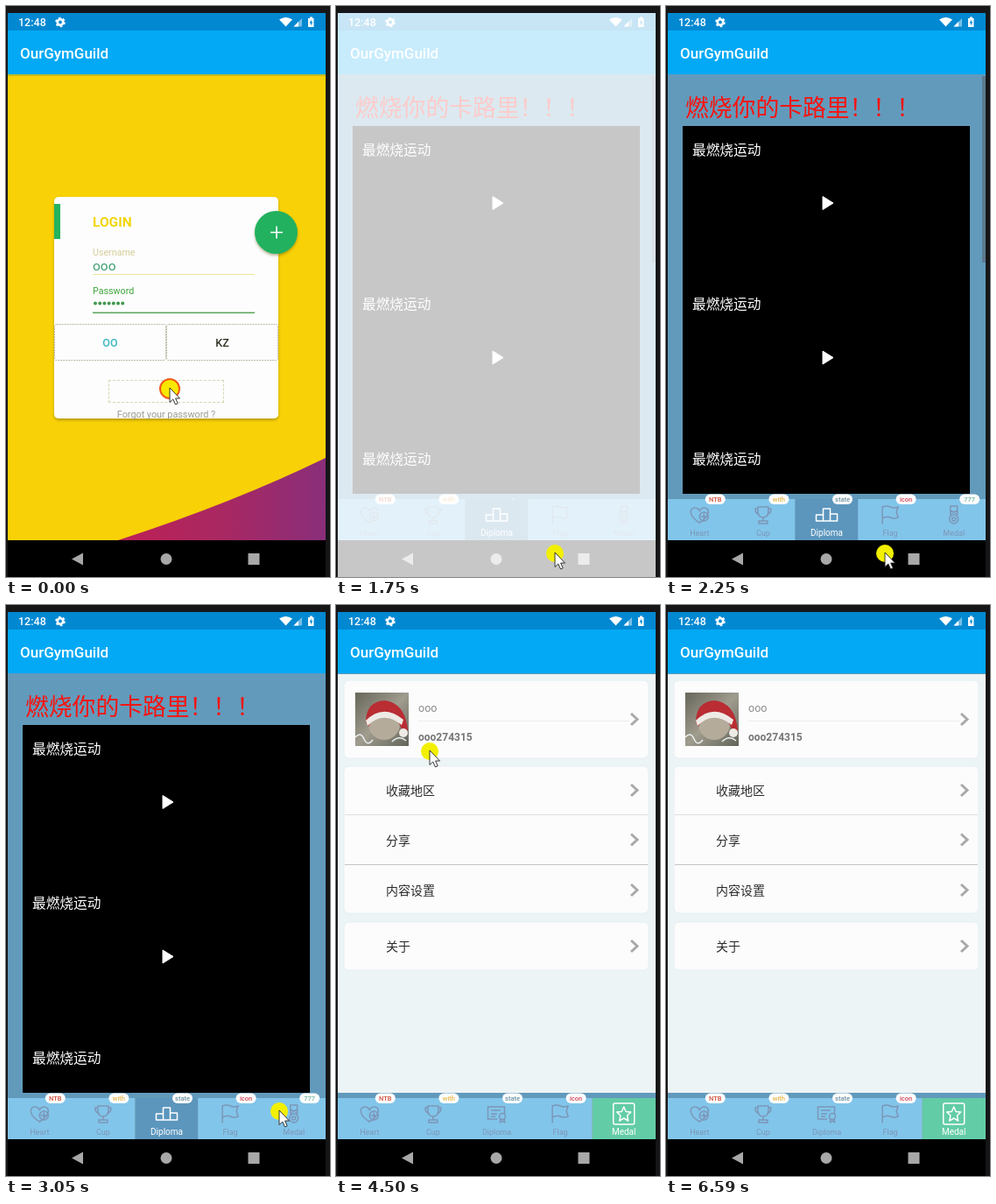
Write an HTML page that moves like this. It is 370 by 652 pixels and loops after 6.63 s.

```html
<!DOCTYPE html>
<html lang="en">
<head>
<meta charset="utf-8">
<title>Sport app walkthrough</title>
<style>
  html, body { margin: 0; width: 100%; height: 100%; overflow: hidden; background: #161618; }
  #stage { position: relative; width: 370px; height: 652px; overflow: hidden; }
  #stage > *, #login > svg, #right, #left { position: absolute; left: 0; top: 0; width: 370px; height: 652px; }
  svg { display: block; font-family: Roboto, "Noto Sans CJK SC", sans-serif; }
  .mid { text-anchor: middle; }
  .cjk { font-family: "Noto Sans CJK SC", "Noto Sans CJK", sans-serif; }
  .icon { fill: none; stroke: currentColor; stroke-width: 1.5; stroke-linejoin: round; stroke-linecap: round; }

  #pager, #scroll, #right, #left, #login, #flip, #veil, #cursor, #ring, #offDiploma, .badge {
    animation: 6630ms linear infinite;
  }

  #pager { animation-name: pager; }
  @keyframes pager {
    0%, 49.08% { transform: translateX(0); animation-timing-function: cubic-bezier(.22, 1, .36, 1); }
    58.7%, 100% { transform: translateX(-726px); }
  }
  #scroll { animation-name: scroll; }
  @keyframes scroll { 0%, 36.5% { opacity: 1; } 42%, 100% { opacity: 0; } }

  /* the tab pointer: its right edge leads, its left edge trails */
  #right { animation-name: right; }
  @keyframes right {
    0%, 49.83% { clip-path: inset(0 150.8px 0 0); animation-timing-function: cubic-bezier(.333, .667, .667, 1); }
    54.36%, 100% { clip-path: inset(0 5px 0 0); }
  }
  #left { animation-name: left; }
  @keyframes left {
    0%, 49.83% { clip-path: inset(0 0 0 147.2px); animation-timing-function: cubic-bezier(.333, 0, .667, .333); }
    54.36%, 100% { clip-path: inset(0 0 0 292.4px); }
  }
  #offDiploma { animation-name: unselect; }
  @keyframes unselect { 0%, 53% { opacity: 0; } 56%, 100% { opacity: 1; } }

  .badge { transform-box: fill-box; transform-origin: center; }
  #badge0, #badge1 { animation: none; }
  #badge2 { animation-name: pop2; }
  #badge3 { animation-name: pop3; }
  #badge4 { animation-name: pop4; }
  @keyframes pop2 { 0%, 26.1% { transform: scale(0); } 29%, 100% { transform: scale(1); } }
  @keyframes pop3 { 0%, 28.4% { transform: scale(0); } 31.4%, 100% { transform: scale(1); } }
  @keyframes pop4 {
    0%, 30.6% { transform: scale(0); }
    33.6%, 57.3% { transform: scale(1); }
    61.7%, 100% { transform: scale(0); }
  }

  #login { animation-name: login; }
  @keyframes login { 0%, 25.94% { visibility: visible; } 25.95%, 100% { visibility: hidden; } }
  #flip {
    position: absolute; left: 117px; top: 427px; width: 132px; height: 26px; box-sizing: border-box;
    border: 1px dashed #d6d6b4; background: #fdfdfd; color: #d8d8d0;
    font: 500 11px/24px Roboto, sans-serif; text-align: center;
    animation-name: flip;
  }
  @keyframes flip {
    0%, 18.85% { transform: perspective(230px) rotateX(0); }
    23.9%, 100% { transform: perspective(230px) rotateX(-180deg); }
  }

  #stage > #veil {
    left: 2px; top: 8px; width: 363px; height: 644px; background: #fff;
    animation-name: veil;
  }
  @keyframes veil {
    0%, 24.1% { opacity: 0; }
    25.94% { opacity: .9; }
    28.36% { opacity: .28; }
    32.4%, 100% { opacity: 0; }
  }

  #cursor { animation-name: cursor; }
  @keyframes cursor {
    0%, 15.84% { transform: translate(187px, 437px); visibility: visible; animation-timing-function: ease-in-out; }
    20.21%, 33.9% { transform: translate(250px, 625px); animation-timing-function: ease-in-out; }
    41.5%, 64.1% { transform: translate(312px, 578px); animation-timing-function: ease-in-out; }
    67.6%, 84.31% { transform: translate(107px, 167px); }
    86.12%, 89.29% { transform: translate(116px, 180px); }
    91.86%, 99.38% { transform: translate(120px, 240px); visibility: visible; }
    99.39%, 100% { transform: translate(120px, 240px); visibility: hidden; }
  }
  #ring { animation-name: ring; }
  @keyframes ring {
    0%, 1.35% { opacity: 1; }
    1.36%, 47.2% { opacity: 0; }
    47.21%, 49.6% { opacity: 1; }
    49.61%, 100% { opacity: 0; }
  }
</style>
</head>
<body>
<div id="stage">
  <svg viewBox="0 0 370 652">
    <rect x="2" y="8" width="363" height="20" fill="#0288d1"/>
    <rect x="2" y="28" width="363" height="51" fill="#03a9f4"/>
    <g fill="#fff">
      <text x="14" y="23" font-size="12.5" font-weight="500">12:48</text>
      <circle cx="62" cy="18.5" r="3.2" fill="none" stroke="#fff" stroke-width="2.6"/>
      <circle cx="62" cy="18.5" r="5" fill="none" stroke="#fff" stroke-width="1.6" stroke-dasharray="2.6 2.63"/>
      <path d="M312 15.5Q319.5 10.5 327 15.5L319.5 23.5Z"/>
      <path d="M328.5 23.5L338 14V23.5Z" opacity=".45"/><path d="M328.5 23.5L334 18V23.5Z"/>
      <path d="M345 14H347V12.5H350V14H351.5V24H345Z"/>
      <path d="M348.8 15.5L346.5 19.5H348V22.5L350.3 18.3H348.8Z" fill="#0288d1"/>
      <text x="16" y="60" font-size="17" font-weight="500">OurGymGuild</text>
    </g>
    <rect x="2" y="78" width="363" height="485" fill="#629abc"/>

    <svg x="2" y="79" width="363" height="478" viewBox="2 79 363 478">
      <g id="pager">
        <g id="videos">
          <text class="cjk" x="22" y="126" font-size="26.8" fill="#f8140f">燃烧你的卡路里！！！</text>
          <rect x="19" y="137" width="328" height="420"/>
          <g id="clips" class="cjk" font-size="15.7" fill="#fff"></g>
          <rect id="scroll" x="361" y="80" width="4" height="213" fill="#5c7a90" opacity=".6"/>
        </g>
        <g transform="translate(363)">
          <rect x="2" y="79" width="363" height="175" fill="url(#gym)"/>
          <path d="M2 150H365V166H2ZM60 79H72V230H60ZM190 79H200V230H190ZM325 85H365V130H325Z" fill="#a4bac4" opacity=".6"/>
          <path d="M2 215H365V254H2Z" fill="#191a1c"/>
          <g id="cards"></g>
        </g>
        <g transform="translate(726)">
          <rect x="2" y="79" width="363" height="478" fill="#edf4f5"/>
          <g fill="#fcfcfd" stroke="#e6f0f1">
            <rect x="9" y="86" width="348" height="89" rx="6"/>
            <rect x="9" y="184" width="348" height="168" rx="6"/>
            <rect x="9" y="362" width="348" height="55" rx="6"/>
          </g>
          <svg x="22" y="100" width="61" height="61" viewBox="0 0 61 61">
            <rect width="61" height="61" fill="url(#photo)"/>
            <circle cx="33" cy="36" r="18" fill="#b5ab9b"/>
            <path d="M12 34Q12 10 34 9Q57 12 60 43L54 46Q50 27 34 25Q22 25 15 39Z" fill="#b92d33"/>
            <path d="M12 32Q32 12 55 31L53 37Q32 20 14 38Z" fill="#eeeae6"/>
            <circle cx="55" cy="46" r="5" fill="#eeeae6"/>
            <path d="M0 51Q6 44 10 53T20 54M42 56Q50 48 58 55" fill="none" stroke="#e8efec" stroke-width="1.5"/>
          </svg>
          <text x="94" y="122" font-size="12.5" fill="#8a8a8a">ooo</text>
          <path d="M94 132.5H335" stroke="#e8eeea"/>
          <text x="94" y="155" font-size="12" font-weight="700" fill="#757575">ooo274315</text>
          <path d="M10 239.5H356" stroke="#dedfe0"/>
          <path d="M10 296.5H356" stroke="#c4c5c6"/>
          <g id="menu" class="cjk" font-size="14" fill="#2b2b2b"></g>
        </g>
      </g>
    </svg>
    <g id="tabs"><rect x="2" y="563" width="363" height="47" fill="#82c5ea"/></g>
    <rect x="2" y="610" width="363" height="42"/>
    <g fill="#a8a8a8">
      <path d="M75 631.5L88 624.5V638.5Z"/><circle cx="183" cy="631.5" r="6.5"/><rect x="276.5" y="625" width="13" height="13"/>
    </g>
    <defs>
      <linearGradient id="gym" x2="0" y2="1"><stop stop-color="#59656b"/><stop offset=".5" stop-color="#262f36"/><stop offset="1" stop-color="#413f3c"/></linearGradient>
      <linearGradient id="photo" x2="1" y2="1"><stop stop-color="#66665a"/><stop offset=".5" stop-color="#a09c8e"/><stop offset="1" stop-color="#62645a"/></linearGradient>
    </defs>
  </svg>

  <div id="right"><div id="left"><svg viewBox="0 0 370 652"><g id="active"></g></svg></div></div>
  <svg id="badges" viewBox="0 0 370 652"></svg>

  <div id="login">
    <svg viewBox="0 0 370 652">
      <defs>
        <linearGradient id="hill"><stop stop-color="#bd2054"/><stop offset=".5" stop-color="#a92862"/><stop offset="1" stop-color="#892e7a"/></linearGradient>
        <filter id="shade" x="-20%" y="-20%" width="140%" height="150%"><feDropShadow dx="0" dy="2" stdDeviation="1.8" flood-color="#5a4a00" flood-opacity=".4"/></filter>
      </defs>
      <rect x="2" y="78" width="363" height="532" fill="#f8d106"/>
      <rect x="2" y="78" width="363" height="2" fill="#9fae34" opacity=".6"/>
      <path d="M128 610Q258 568 365 516V610Z" fill="url(#hill)"/>
      <rect x="55" y="218" width="256" height="253" rx="5" fill="#fdfdfd" filter="url(#shade)"/>
      <rect x="55" y="226" width="7" height="40" fill="#24b35f"/>
      <circle cx="308.5" cy="258.5" r="24.5" fill="#24b15f" filter="url(#shade)"/>
      <path d="M302 258.5H316M309 251.5V265.5" stroke="#fff" stroke-width="1.7"/>
      <text x="99" y="252" font-size="15.5" font-weight="700" fill="#f2d508">LOGIN</text>
      <text x="99" y="285" font-size="10.7" fill="#d3cf9a">Username</text>
      <text x="99" y="302" font-size="15.5" fill="#3d9f70">ooo</text>
      <path d="M99 306.5H284" stroke="#ebe4a0"/>
      <text x="99" y="329" font-size="10.7" fill="#3fa53c">Password</text>
      <path d="M102 339.5H134" stroke="#449750" stroke-width="4" stroke-linecap="round" stroke-dasharray="0 5.2"/>
      <path d="M99 350.3H284" stroke="#5ba55a" stroke-width="1.4"/>
      <g fill="none" stroke="#b8b8a0" stroke-dasharray="2 1">
        <rect x="55.5" y="363.5" width="127" height="41" rx="2"/><rect x="183.5" y="363.5" width="127" height="41" rx="2"/>
      </g>
      <g class="mid" font-size="12.5" font-weight="500">
        <text x="119" y="389" fill="#3db8c4">OO</text><text x="247" y="389" fill="#333326">KZ</text>
      </g>
      <text class="mid" x="183" y="470" font-size="10.8" fill="#9a9a94">Forgot your password ?</text>
    </svg>
    <div id="flip">GO</div>
  </div>

  <div id="veil"></div>
  <svg viewBox="0 0 370 652">
    <g id="cursor">
      <circle r="10" fill="#f2f000"/>
      <circle id="ring" r="11" fill="#f8e800" stroke="#f25a1c" stroke-width="2"/>
      <path d="M0 -1V15.5L3.8 12L6.5 18L9.2 16.8L6.6 11H11.5Z" fill="#fff" stroke="#222" stroke-width=".9"/>
    </g>
  </svg>
</div>

<script>
  const put = (id, markup) => document.getElementById(id).insertAdjacentHTML("beforeend", markup);

  const icons = {
    heart: "M0 9C-13 1-12-8-5-8C-2-8 0-5 0-4C0-5 2-8 5-8C12-8 13 1 0 9M0 2a5 5 0 1 0 10 0a5 5 0 1 0-10 0M5-1V5M2 2H8",
    cup: "M-6-9H6V-3A6 6 0 0 1-6-3ZM-6-7H-9Q-9-1-5-1M6-7H9Q9-1 5-1M0 3V7M-5 10V7H5V10Z",
    podium: "M-12 7V0H-4V7ZM-4 7V-7H4V7ZM4 7V-1H12V7Z",
    paper: "M0 6H-10V-8H9V0M-6-4H4M-6 0H0M-6 3H-2M3 3a3.5 3.5 0 1 0 7 0a3.5 3.5 0 1 0-7 0M4 6V10L6.5 8L9 10V6",
    flag: "M-9 10V-9Q-4-11 0-9T9-9L7-3L9 3Q4 5 0 3T-9 4",
    medal: "M-5 5a5 5 0 1 0 10 0a5 5 0 1 0-10 0M-2 5a2 2 0 1 0 4 0a2 2 0 1 0-4 0M-4 0V-10H4V0M-4-5L4-1M4-5L-4-1",
    star: "M-10-12H10Q12-12 12-10V10Q12 12 10 12H-10Q-12 12-12 10V-10Q-12-12-10-12ZM0-8L2.4-2.5L8-2L3.8 2L5 8L0 5L-5 8L-3.8 2L-8-2L-2.4-2.5Z"
  };
  const tabs = [
    { name: "Heart", off: "heart", on: "heart", fill: "#d97a6c", badge: "NTB", ink: "#d24f3c" },
    { name: "Cup", off: "cup", on: "cup", fill: "#d9b45c", badge: "with", ink: "#e6b84c" },
    { name: "Diploma", off: "paper", on: "podium", fill: "#5c96bd", badge: "state", ink: "#6d93a0" },
    { name: "Flag", off: "flag", on: "flag", fill: "#dc5c90", badge: "icon", ink: "#d4485a" },
    { name: "Medal", off: "medal", on: "star", fill: "#62cca6", badge: "777", ink: "#6fb8a4" }
  ];
  const step = 72.6;

  const tab = (id, x, icon, name, color, size) => `
    <g id="${id}"><g transform="translate(${x} 581)" style="color:${color}">
      <path class="icon" d="${icons[icon]}"/>
      <text class="mid" y="24" font-size="${size}" fill="${color}">${name}</text>
    </g></g>`;

  tabs.forEach((t, i) => {
    const left = 2 + i * step, x = left + step / 2;
    put("tabs", tab("off" + t.name, x, t.off, t.name, "#7c96b8", 9));
    put("active", `<rect x="${left}" y="563" width="${step}" height="47" fill="${t.fill}"/>`
      + tab("on" + t.name, x, t.on, t.name, "#fff", 10));
    put("badges", `<g class="badge" id="badge${i}">
      <rect x="${x + 6.5}" y="557.5" width="23" height="11.5" rx="5.7" fill="#fdfdfd"/>
      <text class="mid" x="${x + 18}" y="566" font-size="7.5" font-weight="500" fill="${t.ink}">${t.badge}</text></g>`);
  });

  [0, 176.5, 353].forEach(y => put("clips", `<text x="30" y="${169.5 + y}">最燃烧运动</text>
    <path d="M179 ${217.5 + y}V${232.5 + y}L191 ${225 + y}Z" stroke="#fff" stroke-linejoin="round"/>`));

  const weight = (x, y) => `<path transform="translate(${x} ${y}) rotate(-15)"
    d="M-15-8V8M-10-10V10M10-10V10M15-8V8M-10 0H10" stroke="#f49280" stroke-width="4" stroke-linecap="round"/>`;
  [295, 516].forEach(y => put("cards", `<rect x="15" y="${y}" width="337" height="167" rx="12" fill="#f2593a"/>
    ${weight(332, y + 118)}${weight(334, y + 142)}`));

  const chevron = y => `<path d="M337 ${y - 6.5}L344 ${y}L337 ${y + 6.5}" fill="none" stroke="#a9a9a9" stroke-width="3"/>`;
  put("menu", chevron(130.5));
  [["收藏地区", 211.5], ["分享", 268], ["内容设置", 325.5], ["关于", 389.5]].forEach(([label, y]) =>
    put("menu", `<text x="57" y="${y + 5.5}">${label}</text>${chevron(y)}`));
</script>
</body>
</html>
```
